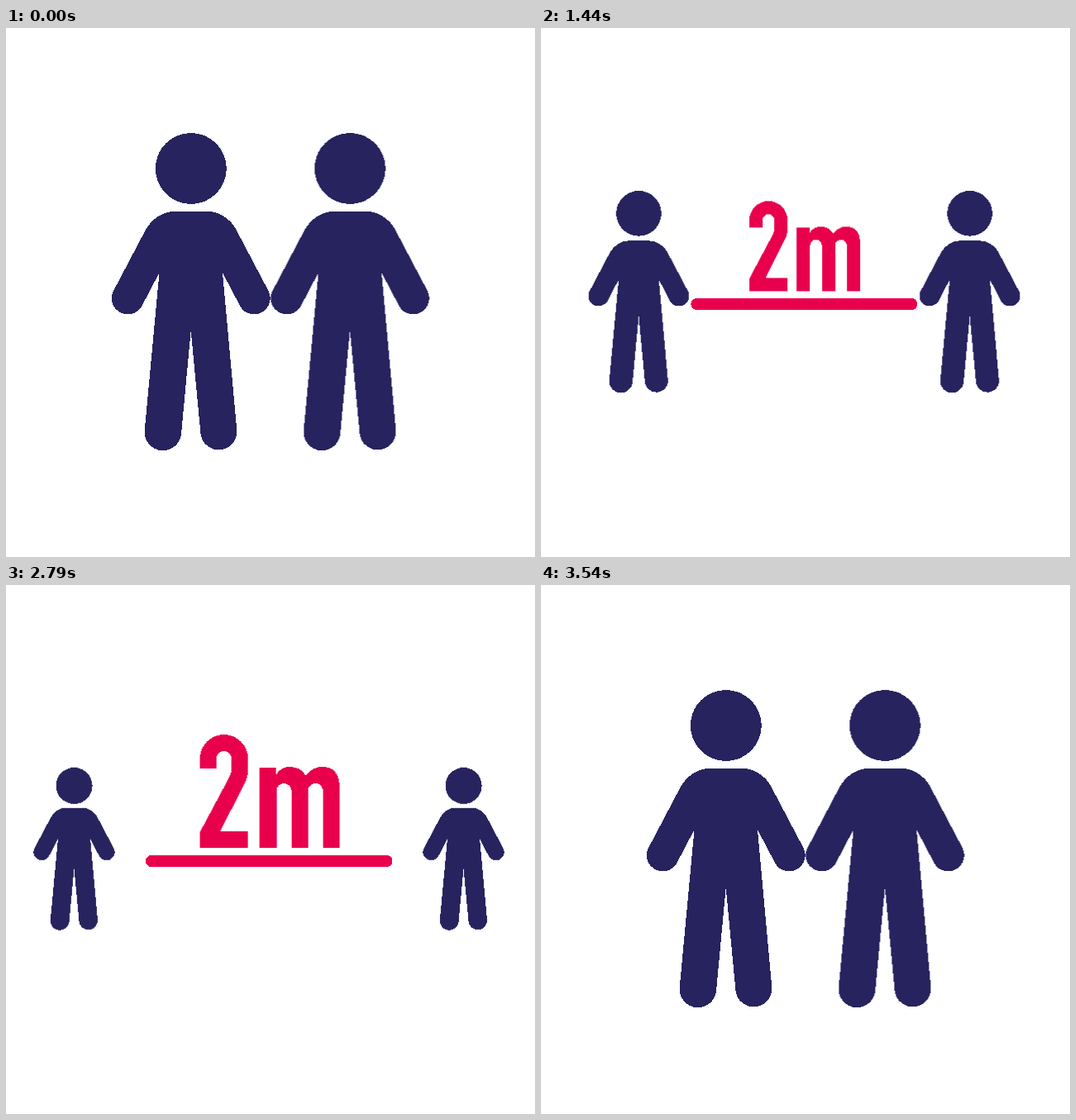
Write an HTML page that moves like this. It is 640 px wide and 640 px high and loops after 3.66 s.

```html
<!DOCTYPE html>
<html lang="en">
<head>
<meta charset="utf-8">
<title>Keep 2m apart</title>
<style>
  html, body { margin: 0; width: 100%; height: 100%; overflow: hidden; background: #fff; }
  svg { display: block; width: 100%; height: 100%; shape-rendering: crispEdges; }

  .person, .label, .bar { animation: 3660ms linear infinite; }
  .person { fill: #27235e; transform-origin: 224px 319.2px; animation-name: part; }
  .left { --dx: -144.4px; }
  .right { --dx: 140.2px; }
  .label, .bar { fill: #e8004d; }
  .label { transform-origin: 319px 318px; animation-name: grow; }
  .bar { rx: 7px; animation-name: stretch, thicken, show; }

  /* step apart, wait, come back together */
  @keyframes part {
    0%, 24.59% { transform: none; animation-timing-function: cubic-bezier(.75, 0, .233, 1); }
    50.82% { transform: translate(var(--dx), 0) scale(.502); }
    71.475% { transform: translate(var(--dx), 0) scale(.502); animation-timing-function: cubic-bezier(.88, 0, 0, 1); }
    96.721%, 100% { transform: none; }
  }

  /* slight overshoot, then settle */
  @keyframes grow {
    0%, 24.59% { transform: scale(0); animation-timing-function: cubic-bezier(.75, 0, .29, 1); }
    50% { transform: scale(1.007); animation-timing-function: ease-in-out; }
    54.098% { transform: scale(.967); }
    72.951% { transform: scale(.967); animation-timing-function: cubic-bezier(.6, 0, .4, 1); }
    87.705%, 100% { transform: scale(0); }
  }

  @keyframes stretch {
    0%, 24.59% { x: 314px; width: 11px; animation-timing-function: cubic-bezier(.75, 0, .215, 1); }
    50.82% { x: 137px; width: 362px; }
    55.738% { x: 137px; width: 362px; animation-timing-function: cubic-bezier(1, 0, .3, 1); }
    96.721%, 100% { x: 314px; width: 11px; }
  }

  @keyframes thicken {
    0%, 25.41% { y: 330px; height: 11px; }
    27.869%, 93% { y: 327px; height: 14px; }
    96.721%, 100% { y: 330px; height: 11px; }
  }

  @keyframes show {
    0% { visibility: hidden; animation-timing-function: step-end; }
    25.4% { visibility: visible; animation-timing-function: step-end; }
    96.7%, 100% { visibility: hidden; }
  }
</style>
</head>
<body>
<svg viewBox="0 0 640 640">
  <defs>
    <g id="person">
      <circle cx="223.8" cy="170" r="43"/>
      <path d="M204 222H244C258 222 272 231 279 245L318 319A19.5 19.5 0 0 1 283.5 337L262 296
        L279.3 487A22 22 0 0 1 235.5 491L223.7 366L212 491A22 22 0 0 1 167.7 487L185.5 296
        L164 337A19.5 19.5 0 0 1 129.5 319L168.5 245C176 231 190 222 204 222Z"/>
    </g>
  </defs>
  <use href="#person" class="person left"/>
  <g transform="translate(192.4 0)"><use href="#person" class="person right"/></g>
  <rect class="bar"/>
  <g class="label" role="img">
    <title>2m</title>
    <path d="M226 212V199A32 32 0 0 1 290 199V212C290 221 289 226 285 233L253 296H290V318H226V297
      L265 224Q268 218 268 212V199A10 10 0 0 0 248 199V212Z"/>
    <path d="M305 211H327V221Q334 210 345 210Q361 210 367 222Q376 210 388 210Q412 210 412 236V318
      H390V242A10 10 0 0 0 370 242V318H348V242A10 10 0 0 0 328 242V318H305Z"/>
  </g>
</svg>
<script>
  // Hold each pose for one 30 ms step.
  const STEP = 30, LOOP = 3660;
  const parts = document.getAnimations();
  const start = performance.now();
  parts.forEach(a => a.pause());

  function tick() {
    const t = (performance.now() - start) % LOOP;
    const pose = Math.floor(t / STEP) * STEP + 0.1;
    parts.forEach(a => { a.currentTime = pose; });
    requestAnimationFrame(tick);
  }
  tick();
</script>
</body>
</html>
```
